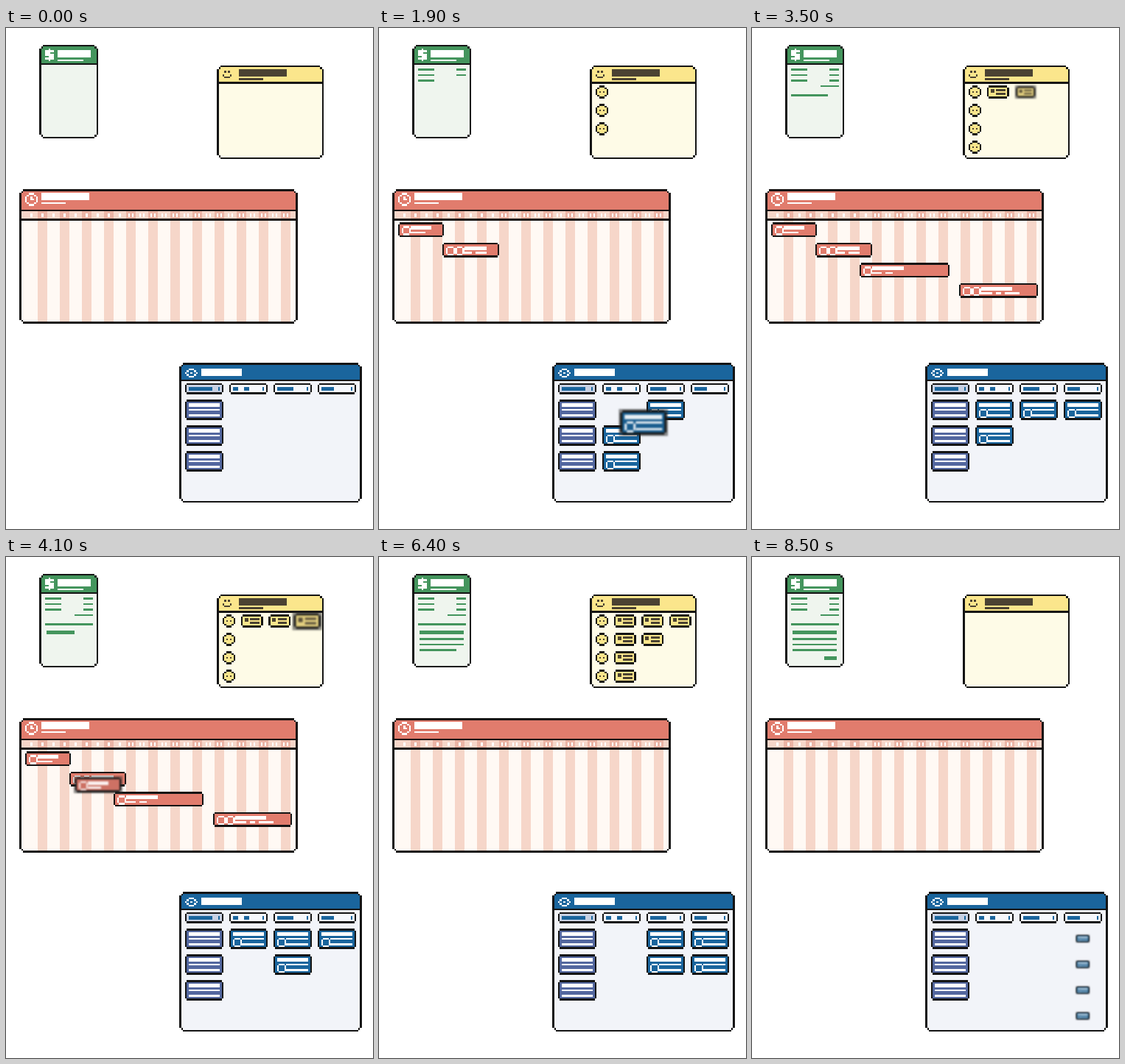
These frames come from a looping animation (498x681 px, 8600 ms). An HTML page with a canvas:

```html
<!DOCTYPE html>
<html lang="en">
<head>
<meta charset="utf-8">
<title>Pixel planner boards</title>
<style>
  html, body { margin: 0; width: 100%; height: 100%; overflow: hidden; background: #fff; }
  canvas { display: block; }
</style>
</head>
<body>
<canvas id="stage" width="498" height="681"></canvas>
<script>
const ctx = document.getElementById('stage').getContext('2d');
const UNIT = 2.5, LOOP = 8600, STEP = 100;
const INK = '#141414', WHITE = '#fff', GREEN = '#44955d', RED = '#e17c6d', PINK = '#f6d6c9';
const YELLOW = '#fbe68c', BROWN = '#4b4232', BLUE = '#1a659d', PURPLE = '#53679f';

const clamp = v => Math.max(0, Math.min(1, v));
const progress = (t, start, duration) => clamp((t - start) / duration);
const ease = u => u * u * (3 - 2 * u);
const mix = (a, b, u) => a + (b - a) * u;

// Origin of the current art and stage pixels per art pixel.
let view = { x: 0, y: 0, size: UNIT };

// Art pixels land on whole stage pixels unless the item is being scaled.
function rect(color, x, y, w = 1, h = 1) {
  const snap = view.size === UNIT ? Math.round : v => v;
  const left = snap(view.x + x * view.size), top = snap(view.y + y * view.size);
  ctx.fillStyle = color;
  ctx.fillRect(left, top, snap(view.x + (x + w) * view.size) - left, snap(view.y + (y + h) * view.size) - top);
}

function words(color, x, y, widths, h, gap) {
  for (const w of widths) {
    rect(color, x, y, w, h);
    x += w + gap;
  }
}

function box(x, y, w, h, fill) {
  rect(INK, x + 1, y, w - 2, h);
  rect(INK, x, y + 1, w, h - 2);
  rect(fill, x + 1, y + 1, w - 2, h - 2);
}

// Rectangle with corners cut in two pixel steps.
function chamfered(color, x, y, w, h) {
  for (let i = 0; i < 3; i++) rect(color, x + i, y + 2 - i, w - 2 * i, h - 4 + 2 * i);
}

function panel(w, h, head, headHeight, body) {
  chamfered(INK, 0, 0, w, h);
  rect(head, 2, 1, w - 4, 1);
  rect(head, 1, 2, w - 2, headHeight - 2);
  rect(body, 1, headHeight + 1, w - 2, h - headHeight - 3);
  rect(body, 2, h - 2, w - 4);
  rect(INK, 0, headHeight, w);
}

function ring(x, y, size) {
  const cut = size > 5 ? 2 : 1, side = size - 2 * cut, end = size - 1;
  for (const edge of [0, end]) {
    rect(WHITE, x + cut, y + edge, side);
    rect(WHITE, x + edge, y + cut, 1, side);
    if (cut > 1) for (const d of [1, end - 1]) rect(WHITE, x + Math.abs(edge - 1), y + d);
  }
}

// Draws an item scaled about its centre; lifted items are soft and cast a halo.
function place(x, y, w, h, scale, lifted, draw) {
  if (scale <= 0) return;
  const outer = view, size = outer.size * scale;
  view = {
    x: outer.x + (x + w / 2) * outer.size - w / 2 * size,
    y: outer.y + (y + h / 2) * outer.size - h / 2 * size,
    size
  };
  if (lifted) {
    ctx.filter = 'blur(1.2px)';
    ctx.globalAlpha = 0.55;
    rect('#333', -0.6, -0.6, w + 1.2, h + 1.2);
    ctx.globalAlpha = 0.9;
  }
  draw();
  ctx.filter = 'none';
  ctx.globalAlpha = 1;
  view = outer;
}

function popScale(u) {
  if (u <= 0 || u >= 1) return Math.round(u);
  return u < 0.5 ? 0.1 + 2.3 * u : 1.25 - 0.5 * (u - 0.5);
}
const popPhase = (t, start, end) => Math.min(progress(t, start, 300), 1 - progress(t, end, 300));

function receipt(t) {
  panel(32, 51, GREEN, 10, '#eff5ee');
  for (let i = 0; i < 3; i++) rect(WHITE, 3, 3 + 2 * i, 5);
  rect(WHITE, 5, 2, 1, 7);
  rect(WHITE, 3, 4, 2);
  rect(WHITE, 6, 6, 2);
  rect(WHITE, 10, 3, 18, 4);
  rect(WHITE, 10, 8, 14);

  // One pen writes every line in turn.
  let left = Math.round(t < 2900 ? Math.min(52, t / 51) : 52 + (t - 2900) / 29.6);
  const write = (x, y, w, h = 1) => {
    if (left > 0) rect(GREEN, x, y, Math.min(w, left), h);
    left -= w;
  };
  for (let y = 13; y <= 19; y += 3) {
    write(3, y, 9);
    write(24, y, 5);
  }
  write(19, 22, 10);
  write(3, 27, 26);
  write(4, 31, 24, 2);
  for (let y = 35; y <= 41; y += 3) write(4, y, 24);
  write(21, 45, 7, 2);
}

function face() {
  chamfered(INK, 0, 0, 7, 7);
  rect(YELLOW, 2, 1, 3, 5);
  rect(YELLOW, 1, 2, 5, 3);
  rect(BROWN, 2, 3);
  rect(BROWN, 4, 3);
}

function tag() {
  box(0, 0, 12, 7, YELLOW);
  rect(BROWN, 2, 2, 2, 2);
  for (const y of [2, 4]) rect(BROWN, 5, y, 5);
}

function people(t) {
  panel(58, 51, YELLOW, 9, '#fefbe7');
  for (const side of [-1, 1]) {
    rect(BROWN, 5 + side, 3);
    rect(BROWN, 5 + 2 * side, 5);
  }
  rect(BROWN, 4, 6, 3);
  rect(BROWN, 12, 2, 26, 4);
  rect(BROWN, 12, 7, 13);

  const pop = (x, row, w, start, draw) => {
    const u = popPhase(t, start, 8200);
    place(x, 11 + 10 * row, w, 7, popScale(u), u < 1, draw);
  };
  let count = 0;
  [3, 2, 1, 1].forEach((tagCount, row) => {
    pop(3, row, 7, 130 + 655 * row, face);
    for (let col = 0; col < tagCount; col++) pop(13 + 15 * col, row, 12, 2870 + 530 * count++, tag);
  });
}

const bars = [
  { hour: 0, hours: 4, avatars: 1, notes: [8] },
  { hour: 4, hours: 5, avatars: 2, notes: [4, 6] },
  { hour: 8, hours: 8, avatars: 1, notes: [5, 4] },
  { hour: 17, hours: 7, avatars: 2, notes: [6, 3, 8] },
  { hour: 14, hours: 4, avatars: 1, notes: [7] }
];

function bar(width, avatars, notes) {
  box(0, 0, width, 8, RED);
  for (let i = 0; i < avatars; i++) ring(2 + 5 * i, 2, 5);
  const left = 2 + 5 * avatars;
  rect(WHITE, left, 2, Math.min(17, width - 7 - left), 2);
  words(WHITE, left, 5, notes, 1, 2);
}

function timeline(t) {
  panel(151, 73, RED, 11, '#fff9f4');
  ring(3, 2, 7);
  rect(WHITE, 6, 4, 1, 2);
  rect(WHITE, 6, 5, 2);
  rect(WHITE, 12, 2, 26, 4);
  rect(WHITE, 12, 7, 13);
  rect(PINK, 1, 12, 149, 4);
  for (let x = 10; x < 150; x += 12) {
    rect(PINK, x, 17, 5, 55);
    rect('#ebb4a5', x, 12, 5, 4);
  }
  for (let hour = 1; hour <= 24; hour++) {
    const digits = hour < 10 ? 1 : 2;
    words(WHITE, 6 * hour + 1 - digits, 13, Array(digits).fill(1), 2, 1);
  }
  rect(INK, 0, 16, 151);

  // Each bar pops up in the first slot, then slides to its own.
  const shrink = 1 - progress(t, 5950, 300);
  bars.forEach(({ hour, hours, avatars, notes }, row) => {
    const start = 80 + 940 * row, width = 6 * hours + 1;
    const pop = progress(t, start, 180), slide = progress(t, start + 180, 210);
    place(3 + 6 * hour * ease(slide), 18 + 11 * row * ease(slide), width, 8,
      popScale(pop) * shrink, slide < 1 || shrink < 1, () => bar(width, avatars, notes));
  });
}

// Which task advances one column, and when.
const moves = [[0, 890], [1, 1750], [0, 2690], [2, 3590], [3, 4490], [1, 5300], [2, 6640], [3, 7700]];
const CARRY = 300, SHIFT = 250;
const columnX = col => 3 + 24 * col;
const rowY = row => 20 + 14 * row;

// Tasks join the end of a column; those left behind close the gap.
const tasks = [0, 1, 2, 3].map(i => ({ col: 1, born: 60 + 130 * i, stops: [{ start: 0, col: 1, row: i }] }));
for (const [index, time] of moves) {
  const task = tasks[index], left = task.col;
  const row = tasks.filter(other => other.col === left + 1).length;
  task.col++;
  task.stops.push({ start: time, col: task.col, row });
  tasks.filter(other => other.col === left)
    .forEach((other, rank) => other.stops.push({ start: time + 200, col: left, row: rank }));
}

function taskPose({ born, stops }, t) {
  const i = stops.findLastIndex(stop => stop.start <= t);
  const to = stops[i], from = stops[Math.max(0, i - 1)];
  const changesColumn = to.col !== from.col;
  const u = progress(t, to.start, changesColumn ? CARRY : SHIFT);
  const carried = changesColumn && u > 0 && u < 1;
  const phase = popPhase(t, born, 8230);
  return {
    x: mix(columnX(from.col), columnX(to.col), ease(u)),
    y: mix(rowY(from.row), rowY(to.row), ease(u)),
    scale: popScale(phase) * (carried ? 1 + 0.2 * Math.sin(Math.PI * u) : 1),
    lifted: carried || phase < 1
  };
}

function card(color, inset) {
  box(0, 0, 21, 11, color);
  rect(WHITE, 2, 2, 17, 2);
  for (const y of [5, 8]) rect(WHITE, inset, y, 19 - inset);
}

function taskCard() {
  card(BLUE, 7);
  ring(2, 5, 5);
}

function board(t) {
  panel(99, 76, BLUE, 9, '#f2f4f9');
  for (const side of [-1, 1]) {
    rect(WHITE, 5, 5 + 2 * side, 3);
    rect(WHITE, 6 + 3 * side, 5);
    for (const y of [4, 6]) rect(WHITE, 6 + 2 * side, y);
  }
  rect(WHITE, 6, 5);
  rect(WHITE, 12, 3, 22, 4);
  [[13], [3, 3], [9], [7]].forEach((label, col) => {
    const x = columnX(col);
    box(x, 11, 21, 6, col ? '#f6f8fc' : '#c8d1e3');
    words(BLUE, x + 2, 13, label, 2, 3);
    rect(BLUE, x + 18, 13, 1, 2);
  });
  for (let row = 0; row < 3; row++) place(3, rowY(row), 21, 11, 1, false, () => card(PURPLE, 2));
  tasks.map(task => taskPose(task, t))
    .sort((a, b) => a.lifted - b.lifted)
    .forEach(pose => place(pose.x, pose.y, 21, 11, pose.scale, pose.lifted, taskCard));
}

function render(now) {
  const t = Math.floor((now % LOOP) / STEP) * STEP;
  ctx.fillStyle = WHITE;
  ctx.fillRect(0, 0, 498, 681);
  const drawAt = (x, y, draw) => {
    view = { x, y, size: UNIT };
    draw(t);
  };
  drawAt(45, 22.5, receipt);
  drawAt(286.25, 50.75, people);
  drawAt(18, 219.25, timeline);
  drawAt(235, 455, board);
}

let origin;
function tick(now) {
  origin ??= now;
  render(now - origin);
  requestAnimationFrame(tick);
}
render(0);
requestAnimationFrame(tick);
</script>
</body>
</html>
```
